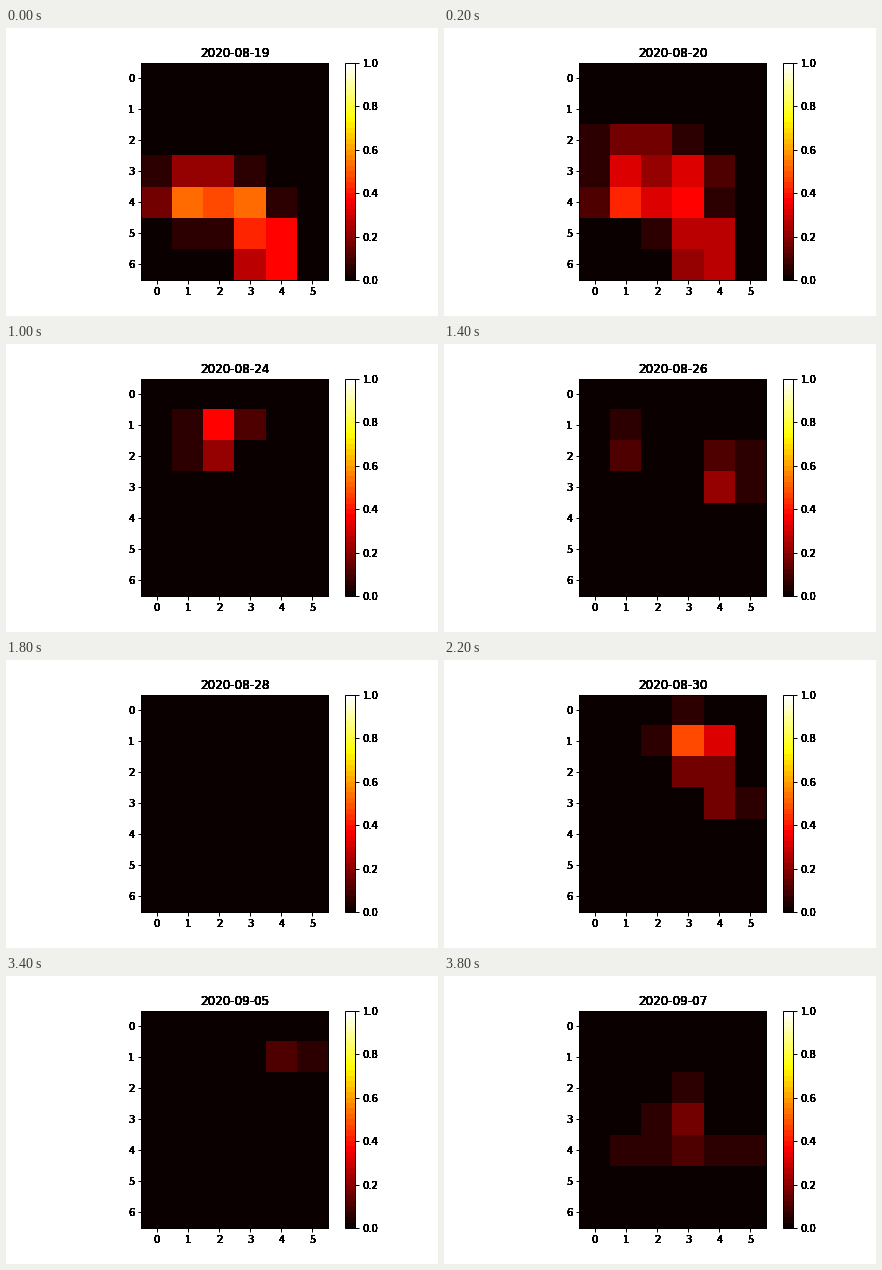
Recreate the animation shown at these times as a matplotlib script. Size 432 px wide and 288 px high, loop 4800 ms.

```python
import numpy as np
import matplotlib.pyplot as plt
from matplotlib.animation import FuncAnimation
from matplotlib.cm import ScalarMappable

W, H, DPI = 432, 288, 72
ROWS, COLS = 7, 6
DAYS, SLOTS, STEP = 20, 24, 200   # the last day is held for the spare slots
SPREAD = .5                       # size of one spot, in cells
UNIT = 1 / 19                     # cell values are whole multiples of this
LAYERS = 16                       # stacked copies give the text its heavy edges

plt.rcParams.update({
    "font.family": "DejaVu Sans",
    "font.size": 10,
    "axes.linewidth": 1,
    "xtick.major.width": 1,
    "ytick.major.width": 1,
})

# day: centres of activity as (row, column, peak)
SPOTS = {
    0: [(3.75, .8, .6), (3.7, 2, .47), (4.25, 3, .53), (5.5, 3.6, .8)],
    3: [(2, 0, .1), (2.25, 1.5, .85), (3.25, 1, .42), (2.95, 3.25, .89),
        (6, 3, .1)],
    5: [(1.37, 1.93, .48), (.8, 3, .06)],
    7: [(1.7, 1, .13), (2.65, 4, .24), (2, 5, .05)],
    8: [],
    10: [],
    11: [(1.22, 3.4, .72), (1, 2, .05), (2.65, 4.2, .19)],
    13: [],
    16: [],
    17: [(1, 4.3, .11)],
    18: [(4.2, 2.6, .15)],
    19: [(2, 3, .05), (3.35, 2.95, .2), (4, 1.5, .09), (4, 4.5, .09)],
}


def field(spots):
    """Sum of round spots that fade out as Gaussians."""
    r, c = np.mgrid[:ROWS, :COLS]
    total = np.zeros((ROWS, COLS))
    for row, col, peak in spots:
        dist2 = (r - row) ** 2 + (c - col) ** 2
        total += peak * np.exp(-dist2 / (2 * SPREAD ** 2))
    return total


def heat(day):
    """Blend the nearest keyed days, then snap to whole units."""
    a = max(d for d in SPOTS if d <= day)
    b = min(d for d in SPOTS if d >= day)
    t = (day - a) / max(b - a, 1)
    blend = (1 - t) * field(SPOTS[a]) + t * field(SPOTS[b])
    return np.round(blend / UNIT) * UNIT


def date(day):
    n = 19 + day
    return f"2020-08-{n:02d}" if n <= 31 else f"2020-09-{n - 31:02d}"


def label(ax, text, xy, shift, coords="data", **kw):
    return [ax.annotate(text, xy, xytext=shift, xycoords=coords,
                        textcoords="offset points", **kw)
            for _ in range(LAYERS)]


fig = plt.figure(figsize=(W / DPI, H / DPI), dpi=DPI, facecolor="white")

# heat map against the right edge of its slot, colour bar beside it
left, bottom, width, height = .125, .125, .775, .755
map_w = height * H * COLS / ROWS / W
bar_w = height * H / 20 / W
ax = fig.add_axes([left + .8 * width - map_w, bottom, map_w, height])
cax = fig.add_axes([left + .85 * width, bottom, bar_w, height])

image = ax.imshow(heat(0), cmap="hot", vmin=0, vmax=1,
                  interpolation="nearest", aspect="auto")
ax.set_xticks(range(COLS), [""] * COLS)
ax.set_yticks(range(ROWS), [""] * ROWS)
for c in range(COLS):
    label(ax, str(c), (c, ROWS - .5), (0, -7), ha="center", va="top")
for r in range(ROWS):
    label(ax, str(r), (-.5, r), (-7, 0), ha="right", va="center_baseline")

scale = ScalarMappable(cmap=plt.get_cmap("hot").resampled(40))
scale.set_clim(0, 1)
levels = np.linspace(0, 1, 6)
bar = fig.colorbar(scale, cax=cax)
bar.set_ticks(levels, labels=[""] * len(levels))
for v in levels:
    label(cax, f"{v:.1f}", (1, v), (7, 0), "axes fraction",
          ha="left", va="center_baseline")

titles = label(ax, date(0), (.5, 1), (0, 6), "axes fraction",
               ha="center", va="baseline", fontsize=12)


def update(slot):
    day = min(slot, DAYS - 1)
    image.set_data(heat(day))
    for t in titles:
        t.set_text(date(day))
    return [image, *titles]


anim = FuncAnimation(fig, update, frames=SLOTS, interval=STEP,
                     init_func=lambda: update(0), repeat=True,
                     repeat_delay=0, blit=False)
plt.show()
```
